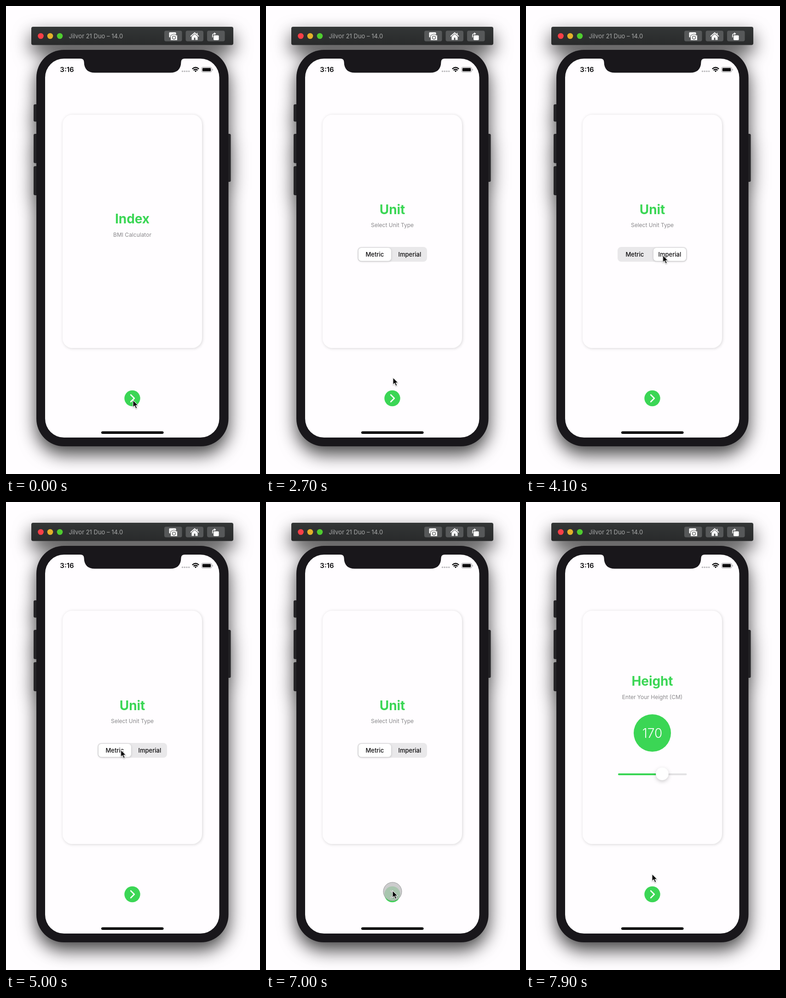
Write an HTML page that moves like this. It is 552x1014 px and loops after 8000 ms.

```html
<!DOCTYPE html>
<html lang="en">
<head>
<meta charset="utf-8">
<title>Phone simulator</title>
<style>
  html, body { margin: 0; width: 100%; height: 100%; overflow: hidden; background: #fffdff; }
  svg { display: block; width: 100vw; height: 100vh; font-family: Inter, Roboto, sans-serif; }

  .device { filter: drop-shadow(0 17px 19px rgba(0, 0, 0, .74)); }
  .card { fill: #fffdff; filter: drop-shadow(1px 1px 3px rgba(0, 0, 0, .16)); }
  .green { fill: #3bd655; }
  .mid { text-anchor: middle; }
  .title { font-size: 28px; font-weight: 700; fill: #3bd655; letter-spacing: -.1px; }
  .sub { font-size: 12px; fill: #89888b; }
  .option { font-size: 13px; font-weight: 500; fill: #0b0a0c; }
  .value { font-size: 28px; font-weight: 300; fill: #fff; }
  .knob { fill: #fff; filter: drop-shadow(0 3px 4px rgba(0, 0, 0, .2)); }
  .arrow { filter: drop-shadow(0 1px 1px rgba(0, 0, 0, .3)); }

  .index, .unit, .height, .thumb, .cursor, .touch { animation: 8s linear infinite; }
  .index { animation-name: index; }
  .unit { animation-name: unit; }
  .height { animation-name: height; }
  .thumb { animation-name: thumb; fill: #fff; filter: drop-shadow(0 1.5px 2px rgba(0, 0, 0, .2)); }
  .cursor { animation-name: cursor; }
  .touch { animation-name: touch; animation-timing-function: step-end; }

  @keyframes index {
    0% { opacity: 1; }
    17.5% { opacity: 1; animation-timing-function: ease-in-out; }
    23.75%, 100% { opacity: 0; }
  }
  @keyframes unit {
    0% { opacity: 0; }
    17.5% { opacity: 0; animation-timing-function: ease-in-out; }
    23.75% { opacity: 1; }
    90% { opacity: 1; animation-timing-function: ease-in-out; }
    97.5%, 100% { opacity: 0; }
  }
  @keyframes height {
    0% { opacity: 0; }
    90% { opacity: 0; animation-timing-function: ease-in-out; }
    97.5%, 100% { opacity: 1; }
  }
  @keyframes thumb {
    0% { transform: none; }
    42.5% { transform: none; animation-timing-function: ease-in-out; }
    47.5% { transform: translateX(76px); }
    58.125% { transform: translateX(76px); animation-timing-function: ease-in-out; }
    62.5%, 100% { transform: none; }
  }
  @keyframes cursor {
    0%, 32.5% { transform: translate(276px, 854px); }
    33.75% { transform: translate(276px, 805px); }
    35% { transform: translate(281px, 725px); }
    36.25% { transform: translate(289px, 635px); }
    37.5% { transform: translate(295px, 575px); }
    38.75% { transform: translate(297.5px, 545px); }
    40% { transform: translate(297.5px, 540px); }
    51.25% { transform: translate(297.5px, 540px); animation-timing-function: ease-in-out; }
    56.25%, 65% { transform: translate(249.5px, 537px); }
    66.25% { transform: translate(250px, 544px); }
    68.75% { transform: translate(254px, 610px); }
    72.5% { transform: translate(267px, 765px); }
    76.25% { transform: translate(273px, 833px); }
    78.75% { transform: translate(275px, 848px); }
    81.25%, 97.5% { transform: translate(275px, 842px); }
    98.75%, 100% { transform: translate(274px, 806px); }
  }
  @keyframes touch {
    0%, 16.875%, 43.125%, 59.375%, 89.375%, 100% { opacity: 0; }
    14.375%, 40.625%, 56.875%, 86.875% { opacity: 1; }
  }
</style>
</head>
<body>
<svg viewBox="0 0 552 1014" preserveAspectRatio="none">
  <defs>
    <linearGradient id="bar" x2="0" y2="1">
      <stop stop-color="#333636"/>
      <stop offset="1" stop-color="#292a2b"/>
    </linearGradient>
  </defs>

  <g class="device">
    <rect x="55" y="45" width="439" height="39.5" rx="4" fill="url(#bar)"/>
    <g fill="#252427">
      <rect x="60" y="213" width="10" height="37.500" rx="3"/>
      <rect x="60" y="277" width="10" height="63.500" rx="3"/>
      <rect x="60" y="347" width="10" height="63" rx="3"/>
      <rect x="478" y="277" width="10.500" height="104" rx="3"/>
    </g>
    <rect x="66" y="95" width="417.500" height="859" rx="60" fill="#19171b"/>
    <rect x="85" y="114" width="378.500" height="821" rx="41" fill="#fffdff"/>
    <path fill="#19171b" d="M162 113V114Q169 114 169.500 121Q170 144.500 193 144.500H357Q380 144.500 380.500 121Q381 114 388 114V113Z"/>
  </g>

  <!-- window bar -->
  <circle cx="75.500" cy="65" r="6.300" fill="#f93f47"/>
  <circle cx="96" cy="65" r="6.300" fill="#e3b02a"/>
  <circle cx="117" cy="65" r="6.300" fill="#4fcc30"/>
  <text x="136.500" y="70" font-size="13" fill="#a8a9a9">Jilvor 21 Duo – 14.0</text>
  <g fill="#565859">
    <rect x="344" y="53.500" width="38.500" height="23" rx="4"/>
    <rect x="390.500" y="53.500" width="38.500" height="23" rx="4"/>
    <rect x="437" y="53.500" width="38.500" height="23" rx="4"/>
  </g>
  <g fill="#fff">
    <rect x="354.500" y="57" width="15" height="11" rx="1.500"/>
    <path stroke="#565859" d="M357.500 64.500q0-1.500 1.500-1.500h2l1.500-2h5l1.500 2h2q1.500 0 1.500 1.500v8.500q0 1.500-1.500 1.500h-12q-1.500 0-1.500-1.500z"/>
    <circle cx="365" cy="68.500" r="3.400" fill="none" stroke="#565859" stroke-width="1.300"/>
    <path d="M403.500 66.500L410 60.500L416.500 66.500V73.500H411.500V68.500H408.500V73.500H403.500Z"/>
    <path d="M401.500 65.500L410 58L418.500 65.500M415.500 59V62" fill="none" stroke="#fff" stroke-width="1.700" stroke-linecap="round"/>
    <rect x="451" y="63.500" width="11.500" height="10.500" rx="1.800"/>
    <path d="M448.800 67.500V64Q448.800 60 453 60" fill="none" stroke="#fff" stroke-width="1.600" stroke-linecap="round"/>
    <path d="M452.500 57L456.500 60L452.500 63Z"/>
  </g>

  <!-- status bar -->
  <text class="mid" x="132.500" y="143" font-size="15" font-weight="600" fill="#0b0a0c">3:16</text>
  <g fill="#bcbbbe">
    <circle cx="383.500" cy="141.500" r="1.800"/>
    <circle cx="388.200" cy="141.500" r="1.800"/>
    <circle cx="392.900" cy="141.500" r="1.800"/>
    <circle cx="397.600" cy="141.500" r="1.800"/>
  </g>
  <g fill="none" stroke="#0b0a0c" stroke-width="2.300">
    <path d="M404.800 136.300Q412 129.700 419.200 136.300"/>
    <path d="M407.500 139.200Q412 135.200 416.500 139.200"/>
    <path d="M409.600 140.800Q412 138.800 414.400 140.800L412 143.300Z" fill="#0b0a0c" stroke="none"/>
  </g>
  <rect x="425" y="132.500" width="22" height="10.800" rx="3" fill="none" stroke="#9b9a9d"/>
  <rect x="426.800" y="134.200" width="18.400" height="7.400" rx="1.600" fill="#0b0a0c"/>
  <path d="M448.500 136v4q1.400-.6 1.400-2t-1.400-2z" fill="#9b9a9d"/>

  <rect class="card" x="123" y="235.500" width="303" height="505.500" rx="21"/>

  <g class="index mid">
    <text class="title" x="274.500" y="471">Index</text>
    <text class="sub" x="274.500" y="499.500">BMI Calculator</text>
  </g>

  <g class="unit mid">
    <text class="title" x="274.500" y="450.500">Unit</text>
    <text class="sub" x="274.500" y="479">Select Unit Type</text>
    <rect x="199" y="522" width="151" height="32" rx="8" fill="#e9e8ea"/>
    <rect class="thumb" x="201" y="524" width="71" height="28.500" rx="6.500"/>
    <text class="option" x="236.300" y="543">Metric</text>
    <text class="option" x="312.300" y="543">Imperial</text>
  </g>

  <g class="height mid">
    <text class="title" x="274.500" y="398">Height</text>
    <text class="sub" x="274.500" y="427">Enter Your Height (CM)</text>
    <circle class="green" cx="274.500" cy="500.500" r="40.500"/>
    <text class="value" x="274.500" y="510.500">170</text>
    <rect x="200" y="588" width="149.500" height="4" rx="2" fill="#e3e2e4"/>
    <rect class="green" x="200" y="588" width="96" height="4" rx="2"/>
    <circle class="knob" cx="296" cy="589" r="13.800"/>
  </g>

  <circle class="green" cx="274.500" cy="850" r="17.200"/>
  <path d="M271.200 842.500L278.800 850L271.200 857.500" fill="none" stroke="#fff" stroke-width="2.600" stroke-linecap="round" stroke-linejoin="round"/>
  <rect x="207" y="921.500" width="135.500" height="5.500" rx="2.750" fill="#000"/>

  <g class="cursor">
    <circle class="touch" cy="2" r="20" fill="#c1c1c3" fill-opacity=".82" stroke="#98989a"/>
    <path class="arrow" d="M0 0V15.600L3.500 12.300L6.100 18.300L8.900 17.100L6.300 11.200H11Z" stroke="#fff" stroke-width="1.100"/>
  </g>
</svg>

<script>
  const LOOP = 8000, STEP = 100;
  const parts = document.getAnimations();
  parts.forEach(part => part.pause());
  const start = performance.now();

  function draw(now) {
    const t = Math.max(0, now - start) % LOOP;
    const time = Math.floor(t / STEP) * STEP;
    parts.forEach(part => { part.currentTime = time; });
    requestAnimationFrame(draw);
  }
  draw(start);
</script>
</body>
</html>
```
